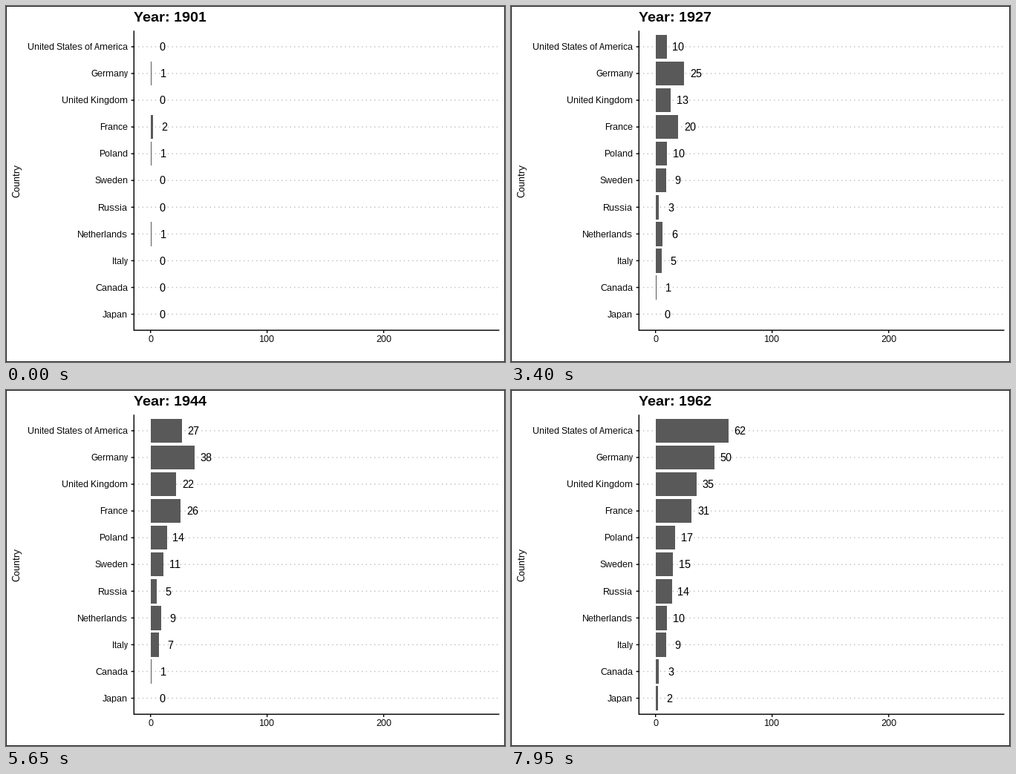
Recreate the animation shown at these times as a matplotlib script. Size 672 by 480 pixels, loop 8000 ms.

```python
import numpy as np
import matplotlib.pyplot as plt
from matplotlib.animation import FuncAnimation
from matplotlib.patches import Rectangle

W, H, DPI = 672, 480, 96
PX = 72 / DPI                    # points per pixel
FRAMES, STEP = 160, 50
FIRST, LAST = 1901, 1962
YEAR_RATE = 114 / 299            # years per frame

plt.rcParams.update({"font.family": "Liberation Sans",
                     "text.hinting": "default", "text.hinting_factor": 1})

# Each running total grows evenly between a few key years
KEY_YEARS = [1901, 1910, 1933, 1944, 1962]
KEY_TOTALS = {
    "United States of America": [0, 1, 13, 27, 64],
    "Germany": [1, 9, 31, 38, 51],
    "United Kingdom": [0, 3, 17, 22, 36],
    "France": [2, 10, 23, 26, 31],
    "Poland": [1, 7, 11, 14, 17],
    "Sweden": [0, 3, 11, 11, 15],
    "Russia": [0, 2, 4, 5, 14],
    "Netherlands": [1, 4, 7, 9, 10],
    "Italy": [0, 4, 5, 7, 9],
    "Canada": [0, 0, 1, 1, 3],
    "Japan": [0, 0, 0, 0, 2],
}

years = np.arange(FIRST, LAST + 1)
steps = np.arange(len(years))
year_frame = np.round(steps / YEAR_RATE) + 1
data = [np.floor(np.interp(years, KEY_YEARS, keys) + 0.5)
        for keys in KEY_TOTALS.values()]

# Panel in pixels, with 5 % padding in x and 0.6 rows in y
LEFT, RIGHT, CEIL, FLOOR = 172.3, 664.4, 33.3, 437.2
UNIT = (RIGHT - LEFT) / 1.1 / 285
X0 = LEFT + (RIGHT - LEFT) * 0.05 / 1.1
PITCH = (FLOOR - CEIL) / (len(data) + 0.2)
rows = CEIL + PITCH * (0.6 + np.arange(len(data)))

fig = plt.figure(figsize=(W / DPI, H / DPI), dpi=DPI, facecolor="white")
ax = fig.add_axes([0, 0, 1, 1])
ax.set_xlim(0, W)
ax.set_ylim(H, 0)
ax.axis("off")


def line(xs, ys, color="black", **kw):
    ax.plot(xs, ys, color=color, lw=1.42 * PX, snap=False,
            solid_capstyle="butt", dash_capstyle="butt", **kw)


def text(x, y, s, px, **kw):
    return ax.text(x, y, s, fontsize=px * PX, va="baseline", zorder=5, **kw)


def number_start(x, s, digit):
    return x - digit * len(s) / 2


ax.add_patch(Rectangle((0.5, 0.5), W - 1, H - 1, fill=False, ec="#222222",
                       lw=PX, snap=False))

bars, labels = [], []
for name, y in zip(KEY_TOTALS, rows):
    line([LEFT, RIGHT], [y, y], "#bebebe", linestyle=(0, (1, 3)), zorder=1)
    line([LEFT - 3.7, LEFT], [y, y], zorder=4)
    text(164, y + 4.2, name, 12, ha="right")
    top, bottom = np.round([y - 0.45 * PITCH, y + 0.45 * PITCH])
    bar = Rectangle((round(X0), top), 0, bottom - top, fc="#595959", lw=0,
                    snap=False, zorder=2)
    bars.append(ax.add_patch(bar))
    labels.append(text(X0, y + 5.2, "", 14.7))

line([LEFT, LEFT], [CEIL, FLOOR + 0.7], zorder=4)
line([LEFT, RIGHT], [FLOOR, FLOOR], zorder=4)
for value in (0, 100, 200):
    x, s = X0 + UNIT * value, str(value)
    line([x, x], [FLOOR, FLOOR + 3.7], zorder=4)
    text(number_start(x, s, 7), 453, s, 12)

text(18, 235, "Country", 13.33, ha="center", rotation=90, rotation_mode="anchor")
title = text(172, 21, "", 18.67, weight="bold")


def draw(i):
    pos = np.interp(i, year_frame, steps)
    shown = int(pos + 0.5)       # counters flip halfway between two years
    title.set_text(f"Year: {FIRST + round(i * YEAR_RATE)}")
    for bar, label, totals in zip(bars, labels, data):
        value = np.interp(pos, steps, totals)
        bar.set_width(max(0, round(X0 + UNIT * value) - bar.get_x()))
        s = f"{totals[shown]:.0f}"
        label.set_text(s)
        label.set_x(number_start(X0 + UNIT * (value + 10), s, 8))
    return [title, *bars, *labels]


anim = FuncAnimation(fig, draw, frames=FRAMES, interval=STEP,
                     init_func=lambda: draw(0), repeat=True, repeat_delay=0)
plt.show()
```
